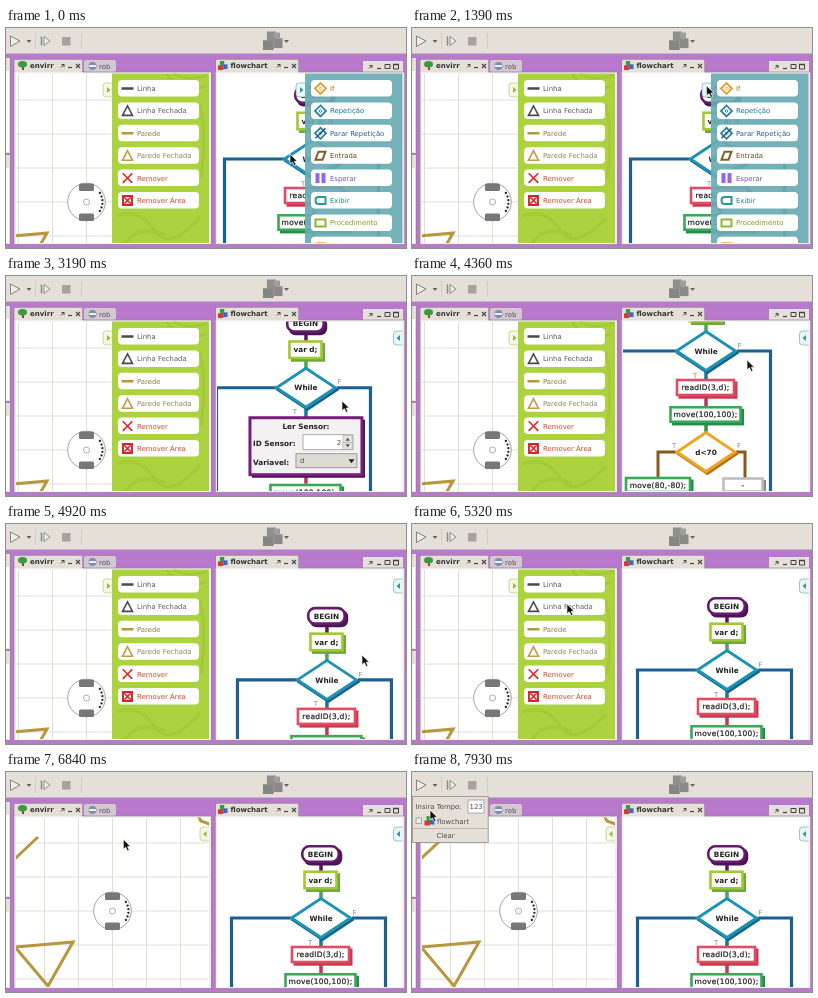
An HTML page for the animation above (8000 ms loop, 400 px wide and 220 px high).

```html
<!DOCTYPE html>
<html lang="pt">
<head>
<meta charset="utf-8">
<title>Flowchart editor</title>
<style>
html,body{margin:0;width:100%;height:100%;overflow:hidden;background:#b878cc}
svg{display:block;width:400px;height:220px}
text{font-family:"DejaVu Sans",sans-serif;font-size:6.9px;fill:#4c4c4c}
.b{font-weight:bold;font-size:7.3px;fill:#222}
.c{font-size:7.5px;letter-spacing:.25px;fill:#222;stroke:#222;stroke-width:.22px}
.t{font-weight:bold;font-size:7px;fill:#333}
.m{text-anchor:middle}
</style>
</head>
<body>
<svg id="stage" viewBox="0 0 400 220" xmlns="http://www.w3.org/2000/svg"></svg>
<script>
const LOOP = 8000;

const rect = (x, y, w, h, fill, more = '') =>
  `<rect x="${x}" y="${y}" width="${w}" height="${h}" fill="${fill}" ${more}/>`;
const path = (d, stroke, w = 1, fill = 'none') =>
  `<path d="${d}" stroke="${stroke}" stroke-width="${w}" fill="${fill}"/>`;
const text = (x, y, s, cls = '', more = '') =>
  `<text x="${x}" y="${y}" class="${cls}" ${more}>${s}</text>`;
const group = (id, body, more = '') => `<g id="${id}" ${more}>${body}</g>`;
const rhomb = (x, y, a, b) => `M${x - a} ${y}L${x} ${y - b}L${x + a} ${y}L${x} ${y + b}Z`;

// --- window chrome ---
const BEIGE = '#e4dfd7', FRAME = '#97809f';

const tabIcons = x =>
  path(`M${x} 39.500l3 -3m-2.500 0h2.500v2.500`, '#444', 1) +
  path(`M${x + 7} 39.500h4`, '#444', 1.2) +
  path(`M${x + 15} 36l4 4m0 -4l-4 4`, '#444', 1.1);

const blocks = (x, y, s, a, b, c) =>
  rect(x, y + s * .45, s * .55, s * .5, a) +
  rect(x + s * .2, y, s * .45, s * .5, b) +
  rect(x + s * .55, y + s * .35, s * .45, s * .5, c);

const down = x => path(`M${x - 2.5} 12h5l-2.5 3Z`, 'none', 0, '#666');

function chrome() {
  return rect(0, 0, 400, 220, '#b878cc') +
    rect(0, 0, 400, 25, BEIGE) + rect(0, 25, 400, 1, '#c4b8c4') +
    path('M4.500 8L14 13L4.500 18.500Z', '#777', .9, '#f0eeea') + down(23) +
    path('M29.500 5v16M75.500 5v16', '#d2ccc4') +
    path('M35.500 8.500v9', '#8a8a86', 1.5) +
    path('M38 8.500L44 13L38 17.500Z', '#7c8a7c', .9, '#eceee8') +
    rect(56, 9, 8.5, 8.5, '#a8a39d') +
    blocks(257, 3.5, 19.5, '#858583', '#8f8f8d', '#8a8a88') +
    rect(268, 4.5, 6, 6, '#a09e9a') + down(280.5) +
    rect(0, 30, 4, 95, BEIGE) + rect(0, 43, 3, 81, '#fff') +
    rect(0, 127, 4, 89, BEIGE) + rect(0, 140, 3, 75, '#fff') +
    path('M4.500 30V125M4.500 127V216', FRAME, .8) +
    // left window
    rect(8, 31, 69, 15, BEIGE, 'rx="2"') +
    rect(78, 32, 32, 12, '#d3c8d2', 'rx="2"') +
    rect(8, 44, 197, 172.5, '#f1eeea') +
    path('M8 216.500V31.500H76.500V44H205.500V216.500Z', FRAME, .7) +
    rect(16, 38, 2, 4, '#80502a') +
    '<ellipse cx="16.500" cy="36.300" rx="4.500" ry="3.200" fill="#3c9a42"/>' +
    text(24, 40, 'envirr', 't') + tabIcons(55) +
    '<circle cx="86.500" cy="38" r="4" fill="#7c8fae"/>' + rect(83, 37, 7, 2, '#e6edf5') +
    text(93, 40.5, 'rob') +
    // right window
    rect(210, 31, 83, 15, BEIGE, 'rx="2"') +
    rect(357, 33, 40, 11, BEIGE) +
    rect(209, 44, 190, 172.5, '#f1eeea') +
    path('M209.500 216.500V31.500H292.500V44H398.500V216.500Z', FRAME, .7) +
    blocks(212, 33, 9.5, '#d43a34', '#3a9a48', '#3a66c0') +
    text(224.5, 40, 'flowchart', 't') + tabIcons(271) +
    path('M363 40.500l3 -3m-2.500 0h2.500v2.500M379 36.500h5v4h-5Z', '#444') +
    path('M371 40.500h4', '#444', 1.2) + path('M387.500 36.500h5v4.500h-5Z', '#444') +
    path('M387 36.500h6', '#444', 1.5);
}

// --- left workspace ---
function robot() {
  let s = '<circle cx="80.500" cy="174" r="18.800" fill="#fff" stroke="#999" stroke-width=".9"/>' +
    '<circle cx="80.500" cy="174" r="3" fill="#fff" stroke="#999" stroke-width=".8"/>';
  for (const y of [155.5, 185.5]) s += rect(73, y, 15, 7.5, '#777', 'rx="1.5"');
  for (let i = -2.5; i <= 2.5; i++)
    s += `<circle cx="${96.5 - i * i * .42}" cy="${174 + i * 3.6}" r="1.150" fill="#222"/>`;
  return s;
}

function room() {
  let d = '';
  for (let i = -4; i < 6; i++) d += `M${80.5 + i * 34} -40V320M-80 ${174 + i * 34}H300`;
  return path(d, '#dfddd4', 1) + robot() +
    path('M-17 210L41 205L16 249Z', '#b8963c', 3) +
    path('M-30 134L6 100M164 75L169 84L180 88', '#b8963c', 3);
}

// --- side panels ---
const tri = (x, y, c) => path(`M${x - 5} ${y + 4.5}L${x} ${y - 5}L${x + 5} ${y + 4.5}Z`, c, 1.6, '#fff');
const cross = (x, y, r, c) =>
  path(`M${x - r} ${y - r}l${2 * r} ${2 * r}m0 ${-2 * r}l${-2 * r} ${2 * r}`, c, 1.6);
const dia = (x, y, c, w = 1.8) => path(rhomb(x, y, 5.5, 5.5), c, w, '#fff') +
  path(rhomb(x, y, 1.6, 1.6), c, 1);
const bar = (x, y, c) => path(`M${x - 6} ${y}h12`, c, 2.4);
const box = (x, y, c) => path(`M${x - 4.5} ${y - 4.5}h9v9h-9Z`, c, 1.9, '#fff');

const leftItems = [
  ['Linha', '#555', (x, y) => bar(x, y, '#4a4a4a')],
  ['Linha Fechada', '#5c5c5c', (x, y) => tri(x, y, '#4a4a4a')],
  ['Parede', '#8c7c48', (x, y) => bar(x, y, '#b8963c')],
  ['Parede Fechada', '#908660', (x, y) => tri(x, y, '#c49a42')],
  ['Remover', '#dc4620', (x, y) => cross(x, y, 4.8, '#e02828')],
  ['Remover Área', '#dc4620', (x, y) => box(x, y, '#d82424') + cross(x, y, 3.2, '#d82424')]
];
const rightItems = [
  ['If', '#a87818', (x, y) => dia(x, y, '#e0a030')],
  ['Repetição', '#24708e', (x, y) => dia(x, y, '#2686ac')],
  ['Parar Repetição', '#24607e', (x, y) => dia(x, y, '#2a7aa0') + path(`M${x - 5} ${y + 5}l10 -10`, '#1d587c', 1.5)],
  ['Entrada', '#6c4818', (x, y) => path(`M${x - 2} ${y - 4}h7l-3 8h-7Z`, '#80602a', 2, '#fff')],
  ['Esperar', '#6e52b0', (x, y) => rect(x - 5, y - 5, 4, 10, '#9068e8') + rect(x + 1, y - 5, 4, 10, '#9068e8')],
  ['Exibir', '#24807c', (x, y) => path(`M${x + 5} ${y - 3.5}h-7q-3 0 -3 3.500t3 3.500h7Z`, '#2a9a98', 2, '#fff')],
  ['Procedimento', '#849424', (x, y) => path(`M${x - 5} ${y - 3.5}h10v7h-10Z`, '#8cb830', 2, '#fff')],
  ['', '#a87818', (x, y) => rect(x - 5, y - 3, 10, 8, '#f0a020')]
];

const items = (x, list) => list.map(([s, c, icon], i) => {
  const y = 60.5 + i * 22.4;
  return rect(x, y - 8.5, 81, 16.5, '#fff', 'rx="4"') + icon(x + 9.5, y) +
    text(x + 19, y + 2.5, s, '', `style="fill:${c}"`);
}).join('');

const toggle = (id, x, bg, c) =>
  rect(x - 9, 55, 12, 14, bg, `rx="3" stroke="${c}" stroke-width=".5"`) +
  `<path id="${id}" fill="${c}"/>`;

function leftPanel() {
  return toggle('arrowL', 106, '#f4f7e6', '#94ba3c') + rect(106, 45, 98, 171, '#add23f') +
    path('M160 46Q176 66 200 58M168 46Q184 54 202 47M194 76Q201 110 195 150M110 188Q134 180 148 202T194 190M120 216Q130 196 160 207', '#a4ca38', 3) +
    items(112, leftItems);
}

function rightPanel() {
  return toggle('arrowR', 299, '#eaf5f5', '#3c949c') +
    rect(299, 45, 98, 171, '#6aacb3', 'opacity=".93"') + items(305, rightItems);
}

// --- flowchart, drawn around the centre of the loop diamond ---
function block(cx, cy, w, h, c, dark, s, cls = 'c', id = '', rx = 0) {
  const x = cx - w / 2, y = cy - h / 2;
  return rect(x + 1.5, y + 1.5, w + 2, h + 2.2, dark, `rx="${rx}"`) +
    rect(x, y, w, h, '#fff', `rx="${rx}" stroke="${c}" stroke-width="2.6"`) +
    text(cx, cy + 2.6, s, cls + ' m', id && `id="${id}"`);
}

const diamond = (cx, cy, a, b, c, dark, s) =>
  path(rhomb(cx + 1.5, cy + 2, a, b), dark, 2.8) +
  path(rhomb(cx, cy, a, b), c, 2.8, '#fff') + text(cx, cy + 2.6, s, 'b m');

const tag = (x, y, s) => text(x, y + 2.6, s, 'm', 'style="fill:#888"');

function editor() {
  return rect(-54, 32, 113, 58, '#48104c') +
    rect(-56, 30, 112, 57, '#f3f1f1', 'stroke="#761c7c" stroke-width="3"') +
    text(0, 41, 'Ler Sensor:', 'b m') +
    text(-53, 58, 'ID Sensor:', 'b') + text(-53, 77, 'Variavel:', 'b') +
    rect(-3, 47, 50, 15, '#fff', 'stroke="#999" stroke-width=".8"') +
    rect(37, 47.5, 9.5, 14, '#e4e0da', 'stroke="#aaa" stroke-width=".6"') +
    path('M39.500 53h4.500l-2.250 -3ZM39.500 56.500h4.500l-2.250 3Z', 'none', 0, '#555') +
    path('M37 54.700h9.500', '#aaa', .6) +
    text(33, 57.5, '2', 'm', 'id="num"') +
    rect(-10, 66, 61, 14, '#dedad4', 'stroke="#888" stroke-width=".8"') +
    text(-6, 75.5, 'd') + path('M42.500 71.500h6l-3 4Z', 'none', 0, '#222');
}

function chart() {
  const below =
    path('M0 46V55', '#c03850', 3.5) + path('M0 72V82', '#329048', 3.5) +
    path('M-30 101H-48V128M30 101H39V128', '#88581c', 3) +
    block(-.5, 63.5, 70, 14.5, '#3aa858', '#288a48', 'move(100,100);') +
    diamond(0, 101, 29, 19.5, '#f0a424', '#b87414', 'd&lt;70') +
    block(-48, 134, 64, 14, '#3aa858', '#288a48', 'move(80,-80);') +
    block(37, 134, 39, 13, '#bdbdbd', '#8c8c8c', '-') +
    tag(-32, 94, 'T') + tag(33, 94, 'F');
  return path('M0 -55V-46', '#5c1764', 3.5) + path('M0 -29V-19', '#55a052', 3.5) +
    path('M-30 0H-89.500V300M31 0H64.500V300', '#1e5f92', 3.2) +
    path('M0 19V30', '#187896', 3.5) +
    block(-.5, -64, 36.5, 15.5, '#641b6c', '#4c1454', 'BEGIN', 'b', '', 7) +
    block(-.5, -38, 32, 16.5, '#a4c832', '#68a83c', 'var d;', 'b') +
    diamond(0, 0, 29.5, 19.5, '#1c92b4', '#14648a', 'While') +
    tag(33.5, -6, 'F') + tag(-11, 24, 'T') +
    group('below', below) +
    group('read', block(-.5, 36.5, 57, 15, '#e44a62', '#c63a50', 'readID(2,d);', 'c', 'readText')) +
    group('edit', editor());
}

function popup() {
  return rect(.4, 24.4, 75.8, 46, BEIGE, 'stroke="#948e88" stroke-width=".8"') +
    text(3.5, 37, 'Insira Tempo:') +
    rect(56, 28, 16, 13, '#fff', 'stroke="#999" stroke-width=".8"') + text(57.5, 37, '123') +
    rect(4, 46, 5.5, 5.5, '#efece8', 'stroke="#999" stroke-width=".8"') +
    blocks(12.5, 44, 10, '#d43a34', '#3a9a48', '#3a66c0') + text(25, 51.5, 'flowchart') +
    path('M1 56.500H76', '#b4aea6', .8) + text(33.5, 65.8, 'Clear', 'm');
}

const $ = id => document.getElementById(id);
$('stage').innerHTML =
  '<defs><clipPath id="clipL"><path d="M10 45.500H203V215H10Z"/></clipPath>' +
  '<clipPath id="clipR"><path d="M211 45.500H396.500V215H211Z"/></clipPath></defs>' + chrome() +
  group('left', rect(10, 45, 194, 171, '#fff') + group('room', room()) +
    group('panelL', leftPanel()), 'clip-path="url(#clipL)"') +
  group('right', rect(211, 45, 186, 171, '#fff') + group('chart', chart()) +
    group('panelR', rightPanel()), 'clip-path="url(#clipR)"') +
  group('popup', popup()) +
  group('cursor', path('M0 0V10L2.400 7.900L4.200 11.700L6 10.900L4.300 7.300H7.400Z', '#fff', .7, '#111'));

// --- motion: [time, x, y] ---
const cursorKeys = [
  [930, 284, 126], [1450, 296, 49], [1630, 295, 60], [1750, 295, 60],
  [2170, 299, 104], [2570, 309, 164], [2720, 309, 164], [3000, 344, 144],
  [3190, 336, 125], [3330, 330, 88], [3510, 337, 114], [3590, 338, 124],
  [3800, 338, 124], [4080, 300, 112], [4360, 335, 84], [4600, 329, 50],
  [4920, 356, 131], [5020, 350, 121], [5260, 140, 85], [5440, 184, 70],
  [5880, 103, 53], [6050, 102, 62], [6270, 102, 62], [6500, 100, 110],
  [6800, 126, 75], [7040, 75, 30], [7400, 22, 8], [7850, 22, 8], [7930, 18, 38]
];
const chartKeys = [
  [3000, 308, 131], [3190, 300, 112], [3330, 294, 75],
  [4620, 294, 75], [4920, 321, 156], [5020, 315, 146]
];

function along(keys, t) {
  let a = keys[0];
  if (t <= a[0]) return [a[1], a[2]];
  for (const b of keys) {
    if (t < b[0]) {
      const p = (t - a[0]) / (b[0] - a[0]);
      return [a[1] + (b[1] - a[1]) * p, a[2] + (b[2] - a[2]) * p];
    }
    a = b;
  }
  return [a[1], a[2]];
}

const span = (t, a, b) => Math.min(1, Math.max(0, (t - a) / (b - a)));
const move = (id, x, y) => $(id).setAttribute('transform', `translate(${x.toFixed(2)} ${y.toFixed(2)})`);
const show = (id, on) => $(id).setAttribute('display', on ? 'inline' : 'none');
const arrow = (id, x, open) =>
  $(id).setAttribute('d', open ? `M${x - 5} 59v6l3.500 -3Z` : `M${x - 2.5} 59v6l-3.500 -3Z`);

function draw(t) {
  const editing = t >= 2740 && t < 4120;
  move('cursor', ...along(cursorKeys, t));
  move('chart', ...along(chartKeys, t));
  move('panelR', 97.5 * span(t, 1750, 2275), 0);
  move('panelL', 97 * span(t, 6260, 6780), 0);
  arrow('arrowR', 299, t < 1760);
  arrow('arrowL', 106, t < 6270);

  const pan = span(t, 6500, 6800);
  move('room', 26 * pan, -35 * pan);

  show('edit', editing);
  show('read', !editing);
  move('below', 0, editing ? 41 : 0);
  const id = t < 3810 ? 2 : 3;
  $('num').textContent = id;
  $('readText').textContent = `readID(${id},d);`;
  show('popup', t >= 7480);
}

const start = performance.now();
function tick() {
  draw((performance.now() - start) % LOOP);
  requestAnimationFrame(tick);
}
draw(0);
requestAnimationFrame(tick);
</script>
</body>
</html>
```
